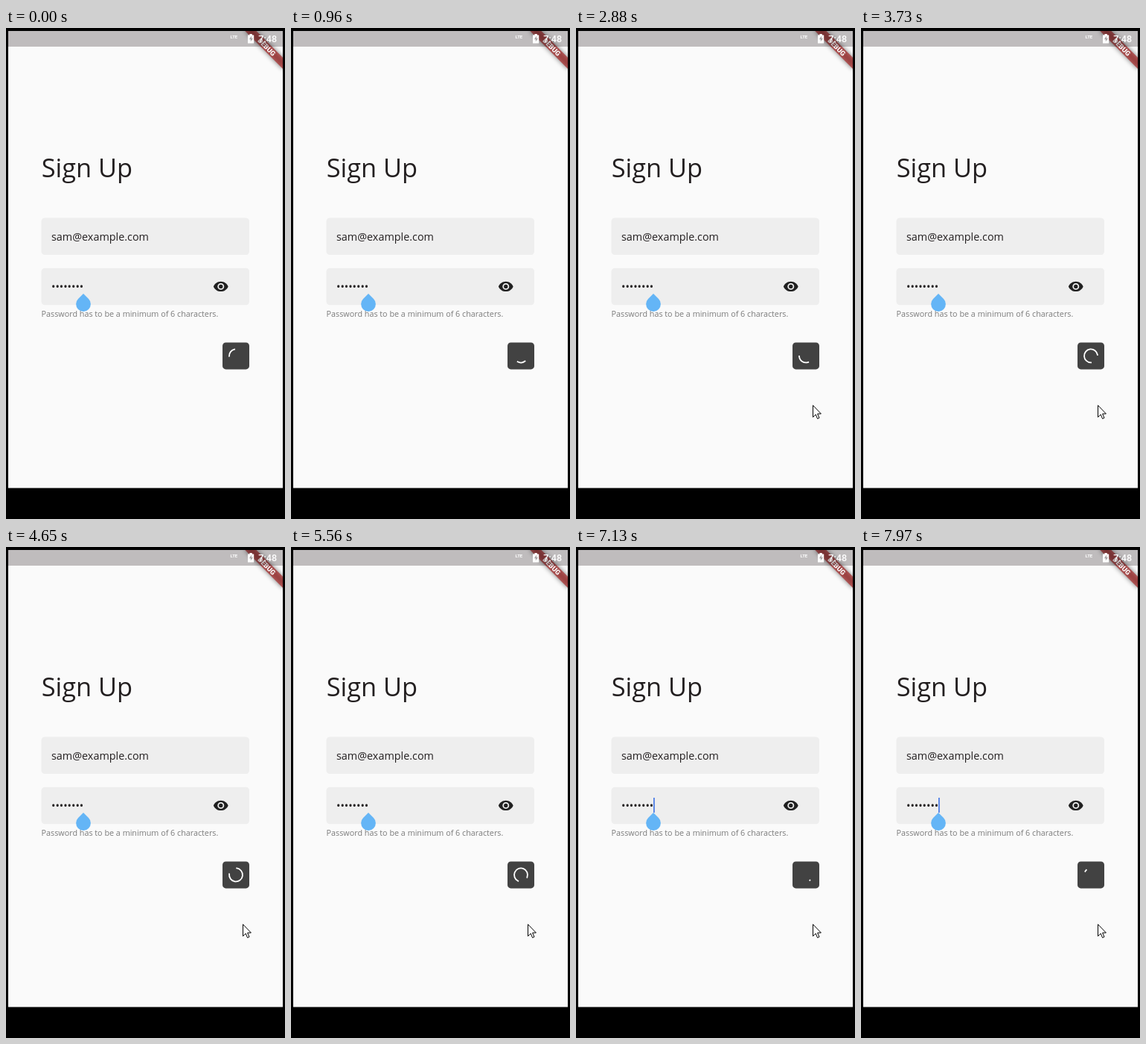
An HTML page for the animation above (8 s loop, 375 by 658 pixels).

```html
<!DOCTYPE html>
<html lang="en">
<head>
<meta charset="utf-8">
<title>Sign Up</title>
<style>
  html, body { margin: 0; width: 100%; height: 100%; overflow: hidden; background: #000; }
  svg { display: block; }
  text { font-family: "Open Sans", sans-serif; fill: #231f20; white-space: pre; }
  .system { font-family: Roboto, sans-serif; fill: #fff; }
</style>
</head>
<body>
<svg width="375" height="658" viewBox="0 0 375 658">
  <defs>
    <clipPath id="screen"><rect x="3" y="4" width="369" height="612.5"/></clipPath>
    <filter id="blur" x="-50%" y="-200%" width="200%" height="500%"><feGaussianBlur stdDeviation="3.3"/></filter>
  </defs>
  <rect width="375" height="658"/>
  <g clip-path="url(#screen)">
    <rect x="3" y="4" width="369" height="613" fill="#fafafa"/>

    <text x="47.7" y="200" font-size="34.3">Sign Up</text>
    <g fill="#eee">
      <rect x="47.5" y="254.5" width="279.5" height="49.5" rx="4.5"/>
      <rect x="47.5" y="321.7" width="279.5" height="49.5" rx="4.5"/>
    </g>
    <text x="61" y="285" font-size="14.37">sam@example.com</text>
    <text x="61" y="352" font-size="14.37">••••••••</text>
    <path transform="translate(278 335.6) scale(.898)" fill="#212121" fill-rule="evenodd"
      d="M12 4.5C7 4.5 2.73 7.61 1 12c1.73 4.39 6 7.5 11 7.5s9.27-3.11 11-7.5c-1.73-4.39-6-7.5-11-7.5zM7 12a5 5 0 0 1 10 0a5 5 0 0 1-10 0zM9 12a3 3 0 0 0 6 0a3 3 0 0 0-6 0z"/>
    <text x="47.6" y="387.3" font-size="10.78" style="fill:#7b7b7b">Password has to be a minimum of 6 characters.</text>

    <rect id="caret" x="104" y="336" width="1.8" height="20" fill="#4f7fe6"/>
    <path transform="translate(104 370) rotate(45)" fill="#64b5f6" d="M-9.9 0V-9.9H0A9.9 9.9 0 1 1-9.9 0z"/>

    <rect x="291" y="421.4" width="36" height="36" rx="4.5" fill="#424242"/>
    <path id="spinner" transform="translate(309 439.4)" fill="none" stroke="#fff" stroke-width="1.8" stroke-linecap="square"/>

    <g transform="translate(372 4) rotate(45)">
      <rect x="-36" y="25.1" width="72" height="10.8" opacity=".5" filter="url(#blur)"/>
      <rect x="-36" y="25.1" width="72" height="10.8" fill="#a81c1c" fill-opacity=".63"/>
      <text class="system" y="33.8" font-size="9.2" font-weight="900" text-anchor="middle">DEBUG</text>
    </g>

    <rect x="3" y="4" width="369" height="21" fill="#0d0206" fill-opacity=".25"/>
    <text class="system" x="301.5" y="14" font-size="6" font-weight="700" textLength="">LTE</text>
    <path fill="#fff" fill-rule="evenodd" d="M325 9.5h2.4V8h3.4v1.5h2.4V20.5H325zM329.8 11l-3 4.2h2v3.3l3-4.4h-2z"/>
    <text class="system" x="339.3" y="19.3" font-size="12.6" font-weight="500">7:48</text>
  </g>
  <path id="pointer" fill="#fff" stroke="#000" stroke-linejoin="miter"
    d="M.5 .7V16.5L4.2 13L6.6 18.6L9 17.5L6.6 12H11.4z"/>
</svg>
<script>
const LOOP = 8000;
const $ = id => document.getElementById(id);
const clamp = x => Math.min(1, Math.max(0, x));

// cubic-bezier(.4, 0, .2, 1), solved by bisection
function fastOutSlowIn(x) {
  let low = 0, high = 1, s = .5;
  for (let i = 0; i < 24; i++) {
    s = (low + high) / 2;
    const bx = 1.2 * s * (1 - s) ** 2 + .6 * s * s * (1 - s) + s ** 3;
    if (bx < x) low = s; else high = s;
  }
  return s * s * (3 - 2 * s);
}

const stepAt = t => Math.floor(t < 776 ? t / 70.6 : 11 + (t - 776) / 77.1);

function spinnerPath(cycles) {
  const turn = Math.floor(cycles), phase = cycles - turn;
  const head = fastOutSlowIn(clamp(phase * 2));
  const tail = fastOutSlowIn(clamp(phase * 2 - 1));
  const start = Math.PI * (-.5 + 1.5 * tail + 1.7 * phase - .8 * turn);
  const sweep = Math.max(1.5 * Math.PI * (head - tail), .01);
  const point = a => `${(9 * Math.cos(a)).toFixed(4)} ${(9 * Math.sin(a)).toFixed(4)}`;
  return `M${point(start)}A9 9 0 ${+(sweep > Math.PI)} 1 ${point(start + sweep)}`;
}

function draw() {
  const step = stepAt(performance.now() % LOOP);
  const cycles = 1.725 + .0782 * step;
  $("spinner").setAttribute("d", spinnerPath(cycles));
  $("caret").style.visibility = (cycles + .2) % 1 < .5 ? "visible" : "hidden";

  // The mouse pointer rises from the bottom edge and settles.
  const rest = (1 - clamp((step - 17) / 6)) ** 2;
  $("pointer").setAttribute("transform", `translate(${318 - 14 * rest} ${505 + 155 * rest})`);
  requestAnimationFrame(draw);
}
draw();
</script>
</body>
</html>
```
